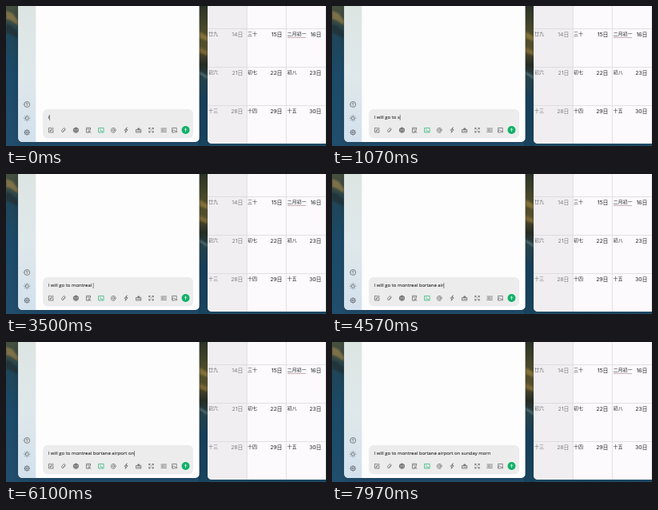
Animation, 400 px wide and 175 px high, one loop 8000 ms. Source, as an HTML page:

```html
<!DOCTYPE html>
<html lang="en">
<head>
<meta charset="utf-8">
<title>Typing beside a calendar</title>
<style>
html, body { margin: 0; width: 100%; height: 100%; overflow: hidden; background: #1d4863; }
svg { display: block; width: 100%; height: 100%; }
.msg { font: 5.95px "Open Sans", "Noto Sans", sans-serif; fill: #333335; stroke: #333335; stroke-width: .12; white-space: pre; }
.lunar { font: 6px "Noto Sans CJK SC", "Noto Sans CJK", sans-serif; }
.day { font: 6.8px Inter, "Noto Sans CJK SC", "Noto Sans CJK", sans-serif; text-anchor: end; }
.icon { fill: none; stroke-width: .75; stroke-linecap: round; stroke-linejoin: round; }
</style>
</head>
<body>
<svg viewBox="0 0 400 175" preserveAspectRatio="none">
  <defs>
    <linearGradient id="sea" x2="0" y2="1">
      <stop offset="0" stop-color="#46503e"/>
      <stop offset=".1" stop-color="#3a4a40"/>
      <stop offset=".2" stop-color="#1f4558"/>
      <stop offset=".5" stop-color="#1c4a69"/>
      <stop offset="1" stop-color="#214e6d"/>
    </linearGradient>
    <linearGradient id="shore" x2="0" y2="1">
      <stop offset="0" stop-color="#2b3428"/>
      <stop offset=".16" stop-color="#4a4a2c"/>
      <stop offset=".3" stop-color="#57522f"/>
      <stop offset=".42" stop-color="#262d26"/>
      <stop offset=".52" stop-color="#26444c"/>
      <stop offset=".66" stop-color="#18405a"/>
      <stop offset="1" stop-color="#1a4560"/>
    </linearGradient>
    <linearGradient id="side" x2="0" y2="1">
      <stop offset="0" stop-color="#dde5e3"/>
      <stop offset=".5" stop-color="#dfe8ea"/>
      <stop offset="1" stop-color="#d3e1ee"/>
    </linearGradient>
    <filter id="soft"><feGaussianBlur stdDeviation="1"/></filter>
    <filter id="shade" x="-10%" width="120%"><feGaussianBlur stdDeviation="3"/></filter>
  </defs>

  <rect width="400" height="175" fill="url(#sea)"/>
  <rect x="240" width="14" height="175" fill="url(#shore)"/>
  <g filter="url(#soft)">
    <path d="M0 6L8 9 15 18V24L6 18 0 16Z" fill="#7d7148"/>
    <path d="M0 22L7 25 15 33V40L0 33Z" fill="#22343a"/>
    <path d="M242 32L252 38V44L242 40Z" fill="#86733a"/>
    <path d="M242 52L252 56V62L242 58Z" fill="#7c6b38"/>
    <path d="M242 82L252 88V91L242 85Z" fill="#59757a"/>
  </g>
  <g filter="url(#shade)" opacity=".15">
    <rect x="15" y="-20" width="227" height="192" rx="6"/>
    <rect x="252" y="-20" width="160" height="194" rx="6"/>
  </g>

  <rect x="15.3" y="-10" width="226.3" height="180" rx="5" fill="#fefdfe"/>
  <path d="M15.3 0H37.3V170H20.3A5 5 0 0 1 15.3 165Z" fill="url(#side)"/>
  <rect x="46" y="129" width="188" height="36.2" rx="6" fill="#ececed"/>
  <g id="icons"></g>
  <text id="msg" class="msg" x="52.5" y="141.3" xml:space="preserve"></text>
  <rect id="caret" y="136" width=".6" height="7" fill="#444"/>

  <g id="calendar"></g>
</svg>
<script>
const $ = id => document.getElementById(id);
const LOOP = 8000, TEXT_X = 52.5;

// Toolbar and sidebar icons, each drawn around its own centre
const circle = r => `M${-r} 0a${r} ${r} 0 1 0 ${2 * r} 0a${r} ${r} 0 1 0 ${-2 * r} 0`;
const rays = (n, a, b) => Array.from({ length: n }, (_, i) => {
  const c = Math.cos(i * 2 * Math.PI / n), s = Math.sin(i * 2 * Math.PI / n);
  return `M${a * c} ${a * s}L${b * c} ${b * s}`;
}).join('');
const box = 'M-3.3-3H3.3V3H-3.3Z';
const icon = (x, y, d, color = '#58595c') =>
  `<path class="icon" transform="translate(${x} ${y}) scale(.93)" stroke="${color}" d="${d}"/>`;

const toolbar = [
  [56.2, 'M0-3H-3V3H3V0M-1 1L-.7-.5 2.4-3.3 3.3-2.4.4.7Z'],
  [71.8, 'M2.4-1L-.1 2.3A1.6 1.6 0 0 1-2.4.2L.3-2.7A1.2 1.2 0 0 1 2-1.2L-.5 1.4'],
  [87.4, circle(3.4) + 'M-3.3 0H3.3M-2.8-1.7H2.8M-2.8 1.7H2.8M0-3.3Q-3 0 0 3.3Q3 0 0-3.3'],
  [103, 'M2.7-.5V-3.2H-2.7V3.2H0M-1.4-1.3H1.4M2.2 1.6A1.2 1.2 0 1 0 2.2 2M2.2 2.6L3.1 3.5'],
  [119, box + 'M-1.6-1.2L-.3 0-1.6 1.2M.3 1.4H1.7', '#1bb36c'],
  [134.4, 'M1.4 0A1.4 1.4 0 1 1-1.4 0A1.4 1.4 0 1 1 1.4 0V.6Q2 1.9 3 .7A3.2 3.2 0 1 0 1.7 2.8'],
  [150.1, 'M.9-3.4L-2.2.6H-.2L-.9 3.4 2.2-.7H.2Z'],
  [165.8, 'M-3.2-.8H3.2V3H-3.2ZM-2 1.1H2M0-.8V-3M-1.4-1.9H1.4'],
  [181.5, 'M-2.9-1.4V-2.9H-1.4M-2.9-2.9L-1-1M2.9-1.4V-2.9H1.4M2.9-2.9L1-1M-2.9 1.4V2.9H-1.4M-2.9 2.9L-1 1M2.9 1.4V2.9H1.4M2.9 2.9L1 1'],
  [197.2, 'M-3.5-2.3H3.5M-3.5 0H-1.4M.2 0H3.5M-3.5 2.3H3.5M-1.2-.7V.7'],
  [210.4, 'M3 0V-3H-3V3H0M-3 1.5L-1-.6 1 1.4M1 2H3.5M2.4.8L3.6 2 2.4 3.2']
];
const sidebar = [
  [123, circle(3.8) + 'M-1.1-.9A1.1 1.1 0 1 1 .4.1Q0 .3 0 .8M0 1.9V2'],
  [140.2, circle(2) + rays(8, 3.2, 4)],
  [158, circle(1.2) + circle(3) + rays(8, 3.1, 3.7)]
];
$('icons').innerHTML =
  toolbar.map(([x, d, color]) => icon(x, 155.2, d, color)).join('') +
  sidebar.map(([y, d]) => icon(26.2, y, d)).join('') +
  '<circle cx="224.5" cy="155" r="5" fill="#12b168"/>' +
  icon(224.5, 155, 'M0 1.8V-1.8M-1.5-.4L0-1.8 1.5-.4', '#fff');

// Calendar window
const lunar = [['廿九', '三十', '二月初一'], ['初六', '初七', '初八'], ['十三', '十四', '十五']];
const colX = [252, 301, 350.5], dayX = [296.3, 345.4, 394.3];
let cal = `<rect x="252" y="-10" width="160" height="182" rx="5" fill="#fcfafd"/>
  <path d="M252 0H301V172H257A5 5 0 0 1 252 167Z" fill="#f0eef1"/>
  <path d="M252 28.5H400M252 76.5H400M252 124.5H400M301.3 0V172M350.3 0V172M399.6 0V172" stroke="#dcdadf" stroke-width=".8"/>`;
lunar.forEach((week, r) => week.forEach((name, c) => {
  const y = 28.5 + r * 48;
  cal += `<text class="lunar" x="${colX[c] + 1}" y="${y + 8}" fill="${c ? '#222224' : '#68686c'}">${name}</text>
    <text class="day" x="${dayX[c]}" y="${y + 9.4}" fill="${c ? '#222224' : '#7c7c80'}">${14 + r * 7 + c}日</text>`;
}));
cal += '<path d="M352 39.5H375" stroke="#a8807e" stroke-width=".6"/>';
$('calendar').innerHTML = cal;

// Typing bursts: start, ms per key, keys ("<" is backspace)
const bursts = [
  [0, 0, 'i'], [160, 70, ' will go to s'], [1350, 0, '<'], [1750, 150, 'mont'],
  [2300, 45, 'real '], [3640, 95, 'bortane '], [4400, 75, 'airpoty'],
  [5420, 90, '<<'], [5620, 95, 'rt on'], [6230, 0, ' '],
  [6480, 140, 'sun'], [6900, 75, 'day '], [7230, 73, 'morn']
];
const keys = bursts.flatMap(([start, step, s]) => [...s].map((key, i) => [start + i * step, key]));

function render(t) {
  let text = '', last = 0;
  for (const [at, key] of keys) {
    if (at > t) break;
    text = key === '<' ? text.slice(0, -1) : text + key;
    last = at;
  }
  text = text.replace(/^i /, 'I ');
  const msg = $('msg');
  if (msg.textContent !== text) msg.textContent = text;
  $('caret').setAttribute('x', TEXT_X + msg.getComputedTextLength());
  $('caret').setAttribute('opacity', (t - last) % 1000 < 500 ? 1 : 0);
}

const begin = performance.now();
function tick() {
  render((performance.now() - begin) % LOOP);
  requestAnimationFrame(tick);
}
tick();
</script>
</body>
</html>
```
